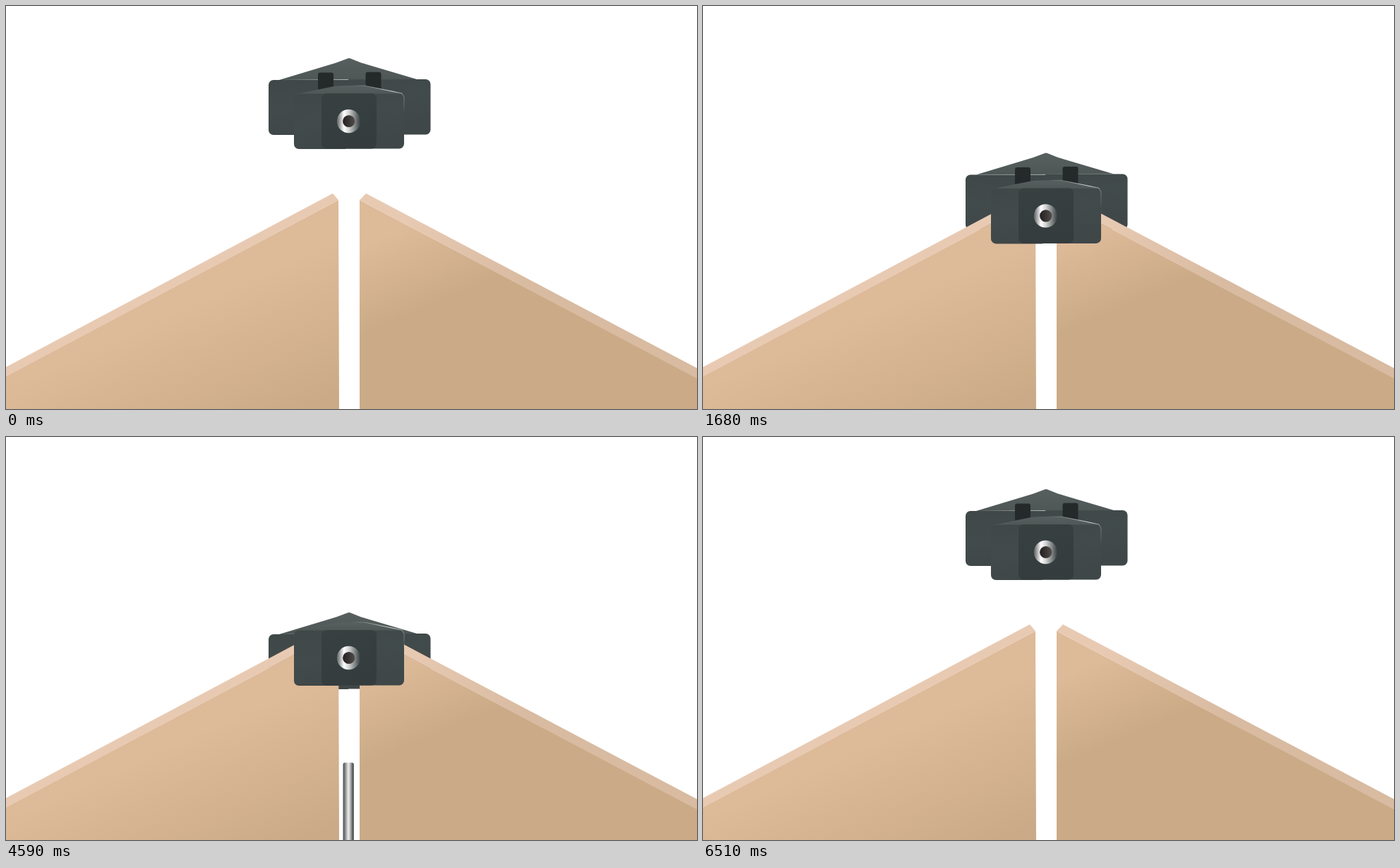
These frames come from a looping animation (979x572 px, 7230 ms). An HTML page:

```html
<!DOCTYPE html>
<html lang="en">
<head>
<meta charset="utf-8">
<title>Panel clamp</title>
<style>
  html, body { margin: 0; width: 100%; height: 100%; overflow: hidden; background: #fff; }
  svg { display: block; width: 979px; height: 572px; }
</style>
</head>
<body>
<svg viewBox="0 0 979 572">
  <defs>
    <linearGradient id="leftFace" gradientUnits="userSpaceOnUse" x1="320" y1="400" x2="400" y2="580">
      <stop stop-color="#ddba98"/><stop offset="1" stop-color="#cbab87"/>
    </linearGradient>
    <linearGradient id="rightFace" gradientUnits="userSpaceOnUse" x1="520" y1="335" x2="565" y2="440">
      <stop stop-color="#ddba98"/><stop offset="1" stop-color="#cbab87"/>
    </linearGradient>
    <linearGradient id="rightEdge" gradientUnits="userSpaceOnUse" x1="570" y1="300" x2="740" y2="390">
      <stop stop-color="#e8cab3"/><stop offset="1" stop-color="#d8bba1"/>
    </linearGradient>
    <linearGradient id="body" x2=".3" y2="1">
      <stop stop-color="#3f4847"/><stop offset=".5" stop-color="#424b4b"/><stop offset="1" stop-color="#3f4748"/>
    </linearGradient>
    <linearGradient id="plate" x2=".3" y2="1">
      <stop stop-color="#384140"/><stop offset="1" stop-color="#343c3e"/>
    </linearGradient>
    <linearGradient id="roof" x2="0" y2="1">
      <stop stop-color="#57605e"/><stop offset="1" stop-color="#4e5756"/>
    </linearGradient>
    <linearGradient id="shine" gradientUnits="userSpaceOnUse" x1="490" y1="113" x2="566" y2="150">
      <stop stop-color="#fff" stop-opacity="0"/><stop offset=".65" stop-color="#fff" stop-opacity=".8"/>
      <stop offset="1" stop-color="#fff" stop-opacity="0"/>
    </linearGradient>
    <linearGradient id="ring">
      <stop stop-color="#5c6062"/><stop offset=".3" stop-color="#fff"/><stop offset=".5" stop-color="#d4d5d5"/>
      <stop offset="1" stop-color="#353d3e"/>
    </linearGradient>
    <linearGradient id="hole">
      <stop stop-color="#231f20"/><stop offset="1" stop-color="#524b4a"/>
    </linearGradient>
    <linearGradient id="steel">
      <stop stop-color="#4b4d4f"/><stop offset=".12" stop-color="#6b6d6f"/><stop offset=".5" stop-color="#f0f0f0"/>
      <stop offset=".68" stop-color="#b5b6b7"/><stop offset=".9" stop-color="#55575a"/><stop offset="1" stop-color="#48494b"/>
    </linearGradient>
  </defs>

  <g id="back">
    <path fill="url(#body)" d="M379 105H485V104H594.500a7 7 0 0 1 7 7V175.500a7 7 0 0 1-7 7H485V183H379a7 7 0 0 1-7-7V112a7 7 0 0 1 7-7Z"/>
    <path fill="url(#roof)" d="M387 105L468 80.500L484 74.500Q486 73.500 488 74.500L503 80.500L582 104Z"/>
    <rect x="442" y="94.500" width="22" height="40" rx="3" fill="#242a2a"/>
    <rect x="509.500" y="93.700" width="22" height="40" rx="3" fill="#242a2a"/>
  </g>

  <path fill="url(#leftFace)" d="M0 525.500L471 275.500L472 572H0Z"/>
  <path fill="#e8cab3" d="M0 512.500L463 266L471 275.500L0 526Z"/>
  <path fill="url(#rightFace)" d="M501 275.500L979 528V572H501Z"/>
  <path fill="url(#rightEdge)" d="M501 275.500L510 266L979 514V528.500Z"/>

  <g id="front">
    <path fill="url(#roof)" d="M411 125L466 113.800Q486 112.500 508 113L561 124V126H411Z"/>
    <path fill="url(#body)" d="M415 124.500H557.500a6.500 7 0 0 1 6.500 7V195.500a7 7 0 0 1-7 7H481V203H415a7 7 0 0 1-7-7V131.500a7 7 0 0 1 7-7Z"/>
    <rect x="447" y="124" width="78" height="78.500" rx="7" fill="url(#plate)"/>
    <path fill="none" stroke="url(#shine)" d="M490 113L508 113L561 124L564 129.500V150"/>
    <circle cx="485.500" cy="163.500" r="16.700" fill="url(#ring)"/>
    <circle cx="485.700" cy="163.500" r="8.600" fill="url(#hole)"/>
  </g>

  <rect id="key" x="477.500" width="15.300" height="166" rx="2.500" fill="url(#steel)"/>
</svg>
<script>
  const LOOP = 7230, STEP = 30;
  const [back, front, key] = ["back", "front", "key"].map(id => document.getElementById(id));

  // Cubic bezier (x1, 0, 2/3, 1), solved by bisection.
  function ease(u, x1) {
    if (u <= 0) return 0;
    if (u >= 1) return 1;
    let lo = 0, hi = 1;
    for (let i = 0; i < 24; i++) {
      const s = (lo + hi) / 2, r = 1 - s;
      const x = 3 * r * r * s * x1 + 2 * r * s * s + s * s * s;
      if (x < u) lo = s; else hi = s;
    }
    return lo * lo * (3 - 2 * lo);
  }

  const SOFT = 1 / 3, QUICK = 1 / 6;

  function draw(now) {
    const tick = Math.floor((now % LOOP) / STEP);
    const move = (start, end, x1) => ease((tick - start) / (end - start), x1);
    const lower = move(24, 64, SOFT);
    const tighten = move(106, 141, QUICK);
    const lift = 1 - move(177, 217, QUICK);
    const insert = move(77, 105, SOFT);
    const remove = move(141, 165, QUICK);

    front.setAttribute("transform", `translate(0 ${150 * lower * lift})`);
    back.setAttribute("transform", `translate(0 ${(150 * lower + 25 * tighten) * lift})`);
    key.setAttribute("y", 573 - 265 * (insert - remove));
  }

  function loop() {
    draw(performance.now());
    requestAnimationFrame(loop);
  }
  loop();
</script>
</body>
</html>
```
